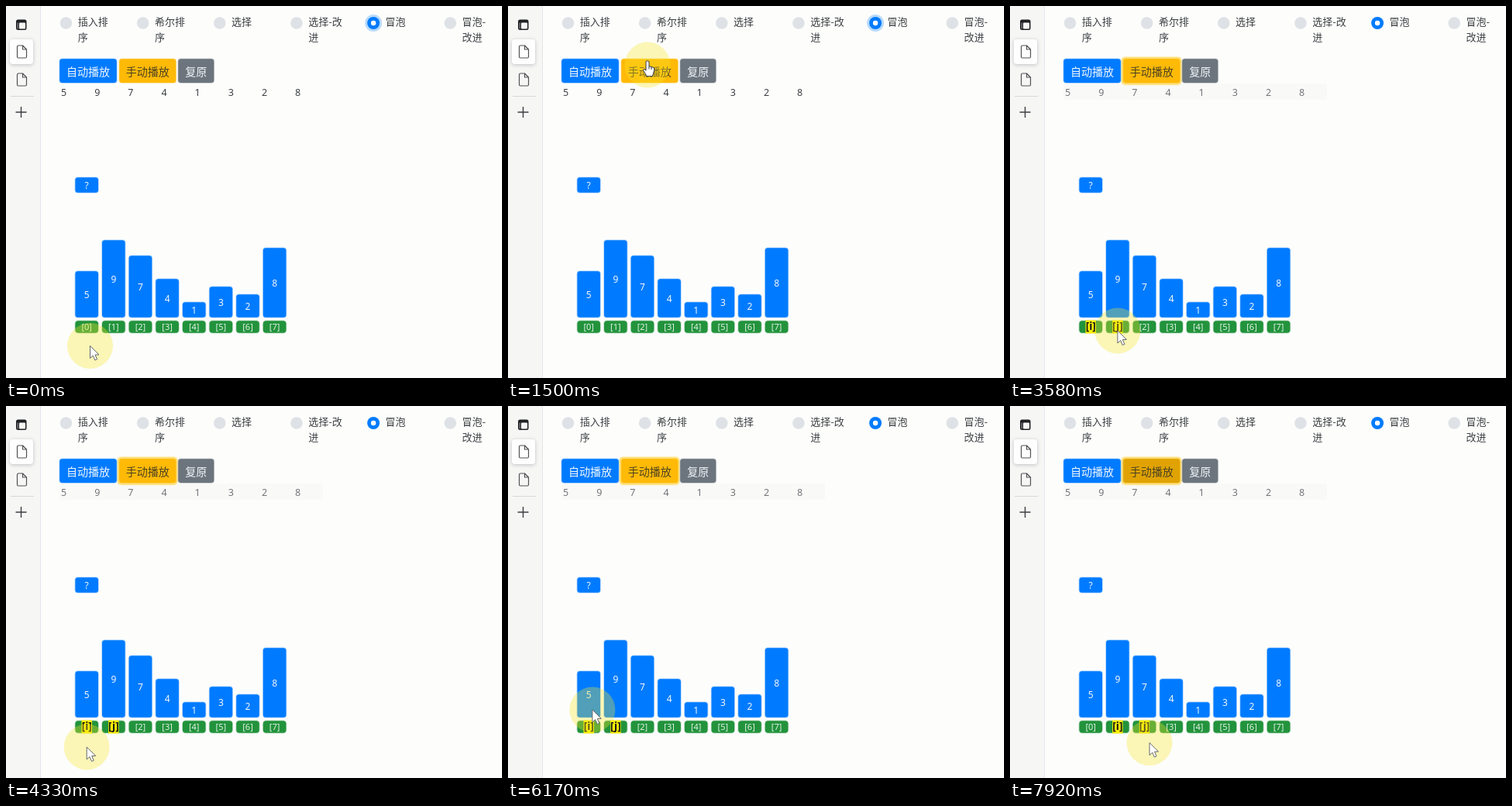
An HTML page with a canvas that plays this animation: 640 by 480 pixels, repeating every 8 s.

```html
<!DOCTYPE html>
<html lang="zh-CN">
<head>
<meta charset="utf-8">
<title>排序演示</title>
<style>
  html, body { margin: 0; width: 100%; height: 100%; overflow: hidden; background: #fdfdfc; }
  canvas { display: block; width: 640px; height: 480px; }
</style>
</head>
<body>
<canvas id="stage" width="640" height="480"></canvas>
<script>
const ctx = document.getElementById('stage').getContext('2d');
const LOOP = 8, FPS = 12, CLICKS = [2, 7.74];
const SANS = '"Noto Sans", "Open Sans", "Noto Sans CJK SC", sans-serif';
const CJK = '"Noto Sans CJK SC", "Noto Sans CJK", "Noto Sans", sans-serif';
const PAGE = '#fdfdfc', BLUE = '#007bff', GREEN = '#22933c', GRAY = '#6c757d';
const INK = '#3c3f42', DARK = '#202124', PALE = '#f2f7fc';

const values = [5, 9, 7, 4, 1, 3, 2, 8];
const modes = ['插入排/序', '希尔排/序', '选择', '选择-改/进', '冒泡', '冒泡-/改进'];
const CHOSEN = 4;

const slotX = i => 89.2 + 34.63 * i;
const underSlot = (i, dy) => [slotX(i) + 15, 414 + dy];
const onButton = [180, 76];

// Stops of the pointer: arrival and departure in seconds, place
const stops = [
  [0, 0.33, [108.5, 438.5]],
  [0.8, 0.8, underSlot(6.3, 14)],
  [1.17, 1.2, underSlot(0.7, 32)],
  [1.5, 2.08, onButton],
  [2.42, 2.67, underSlot(0, 8)],
  [3, 3, underSlot(0, 26)],
  [3.58, 3.58, underSlot(1, 5)],
  [4, 4, underSlot(6.5, 12)],
  [4.33, 4.33, underSlot(0, 26)],
  [5.17, 5.17, [108, 400.5]],
  [5.67, 5.67, underSlot(1.2, -28)],
  [6, 6, underSlot(0, -8)],
  [7.08, 7.08, [177, 186.5]],
  [7.34, 7.84, onButton],
  [7.91, LOOP, [180, 434.5]]
];

const mix = (a, b, k) => a + (b - a) * k;
const ease = u => u * u * (3 - 2 * u);

function pointerAt(t) {
  const next = stops.findIndex(([arrive]) => arrive > t);
  if (next < 0) return stops[stops.length - 1][2];
  const [, leave, from] = stops[next - 1], [arrive, , to] = stops[next];
  const k = ease(Math.max(0, (t - leave) / (arrive - leave)));
  return from.map((v, axis) => mix(v, to[axis], k));
}

function box(x, y, w, h, r, fill) {
  ctx.beginPath();
  ctx.roundRect(x, y, w, h, r);
  ctx.fillStyle = fill;
  ctx.fill();
}

// A box with the slightly soft rim of scaled video
function softBox(x, y, w, h, r, fill) {
  ctx.globalAlpha = 0.3;
  box(x - 0.6, y - 0.6, w + 1.2, h + 1.2, r + 0.6, fill);
  ctx.globalAlpha = 1;
  box(x + 0.2, y + 0.2, w - 0.4, h - 0.4, r, fill);
}

function disc(x, y, r, fill) {
  ctx.beginPath();
  ctx.arc(x, y, r, 0, Math.PI * 2);
  ctx.fillStyle = fill;
  ctx.fill();
}

function text(str, x, y, size, fill, { align = 'center', family = SANS, weight = 'normal' } = {}) {
  ctx.font = `${weight} ${size}px ${family}`;
  ctx.textAlign = align;
  ctx.fillStyle = fill;
  ctx.fillText(str, x, y);
}

function shape(d, x, y, stroke, width, fill) {
  const p = new Path2D(d);
  ctx.save();
  ctx.translate(x, y);
  ctx.lineJoin = 'round';
  if (fill) {
    ctx.fillStyle = fill;
    ctx.fill(p);
  }
  ctx.strokeStyle = stroke;
  ctx.lineWidth = width;
  ctx.stroke(p);
  ctx.restore();
}

const pageIcon = y =>
  shape('M7 0H1.5Q0 0 0 1.5V14.5Q0 16 1.5 16H10.5Q12 16 12 14.5V5L7 0V5H12', 14.5, y, '#505254', 1.2);

function sidebar() {
  box(0, 0, 45, 480, 0, '#f6f6f5');
  box(44, 0, 1, 480, 0, '#e4e5ea');
  box(13, 17.5, 13.5, 13.5, 2.5, DARK);
  box(17, 21.5, 8, 8, 1, '#f6f6f5');
  box(14.5, 21.5, 1.5, 8, 0.5, '#77797c');

  ctx.save();
  ctx.shadowColor = 'rgba(50,55,65,.28)';
  ctx.shadowBlur = 5;
  ctx.shadowOffsetY = 1;
  box(5, 43, 30, 32, 4, '#fefefe');
  ctx.restore();
  pageIcon(51);
  pageIcon(87);
  box(6, 116, 30, 1, 0, '#d6d7da');
  shape('M-7 0H7M0 -7V7', 19.5, 137, INK, 1.4);
}

function radios(focused) {
  modes.forEach((label, i) => {
    const x = 77.5 + 99.15 * i;
    if (i === CHOSEN) {
      if (focused) disc(x, 22, 11, '#b9dafb');
      disc(x, 22, 8, BLUE);
      disc(x, 22, 3.2, '#fff');
    } else {
      disc(x, 22, 7.8, '#dee2e6');
    }
    label.split('/').forEach((part, row) =>
      text(part, x + 15.3, 25 + 20 * row, 13, INK, { align: 'left', family: CJK }));
  });
}

function button(label, x, w, fill, ink) {
  softBox(x, 68, w, 31.3, 3.5, fill);
  text(label, x + w / 2, 89.5, 14, ink, { family: CJK });
}

function buttons(hover, focused) {
  if (focused) softBox(143.5, 65.5, 78, 36.5, 5, '#ffe07a');
  button('自动播放', 69, 74, BLUE, PALE);
  button('手动播放', 146, 73.5, hover ? '#e0a303' : '#ffb907', '#4b4223');
  button('复原', 222, 46.5, GRAY, PALE);
}

function numberRow(clicked) {
  if (clicked) box(69, 100, 340, 20.5, 0, '#f9f9f8');
  values.forEach((v, i) =>
    text(v, 71 + 43.15 * i, 115.5, 12.5, clicked ? '#737577' : INK, { align: 'left' }));
}

function chart(first) {
  softBox(89.2, 221, 30, 20, 3.5, BLUE);
  text('?', 104, 235.5, 12, PALE);

  values.forEach((v, i) => {
    const x = slotX(i), mid = x + 15, h = 10 * v + 10;
    softBox(x, 402 - h, 30, h, 3.5, BLUE);
    text(v, mid, 406.5 - h / 2, 12, PALE);
    softBox(x, 406, 30, 16, 4, GREEN);
    const mark = first < 0 ? '' : 'ij'.charAt(i - first);
    if (mark) {
      box(mid - 6.7, 405.5, 13.4, 17, 0, '#ffef00');
      text(`[${mark}]`, mid, 417.5, 13.5, '#14161a', { weight: 'bold' });
    } else {
      text(`[${i}]`, mid, 418, 11, '#e4f3e8');
    }
  });
}

function pointer([x, y]) {
  disc(x, y, 29.5, 'rgba(246,230,40,.33)');
  if (x > 146 && x < 219 && y > 67 && y < 100) {
    shape('M-2 12V1Q0 -1.5 2 1V6.5L8 8.5Q9 9 8.5 13L6.5 19.5H-1L-5.5 12Q-5 9 -2 12ZM2 6.5V10.5M5 8V11',
      x, y - 5, '#46474a', 1.1, '#fff');
  } else {
    shape('M0 0V16L3.8 12.6L6.3 18.5L9 17.4L6.5 11.6L11.5 11.4Z', x, y, '#66686c', 1, '#fff');
  }
}

function draw(t) {
  const clicks = CLICKS.filter(c => t >= c).length;
  const hover = (t > 1.55 && t < 2.17) || t > 7.33;
  box(0, 0, 640, 480, 0, PAGE);
  sidebar();
  radios(!clicks);
  numberRow(clicks > 0);
  buttons(hover, clicks > 0);
  chart(clicks - 1);
  pointer(pointerAt(t));
}

const start = performance.now();
function tick() {
  const t = (performance.now() - start) / 1000 % LOOP;
  draw(Math.floor((t + 0.005) * FPS) % (LOOP * FPS) / FPS);
  requestAnimationFrame(tick);
}
tick();
</script>
</body>
</html>
```
